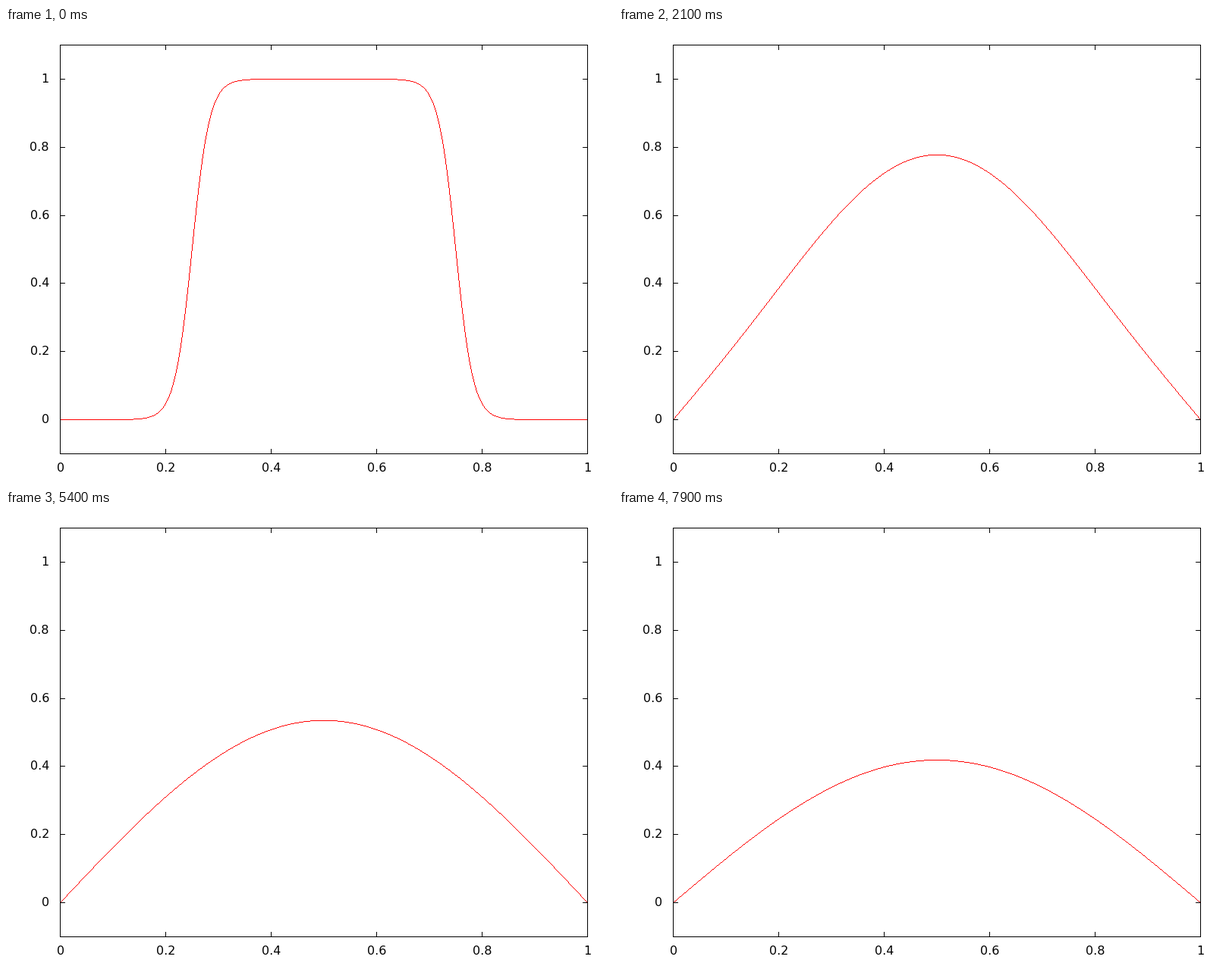
Write a matplotlib script that moves like this. It is 800 px wide and 600 px high and loops after 8000 ms.

```python
import numpy as np
import matplotlib.pyplot as plt
from matplotlib.animation import FuncAnimation
from matplotlib.collections import PolyCollection

W, H = 800, 600
LEFT, RIGHT, TOP, BOTTOM = 71, 766, 22, 561
FRAMES, INTERVAL = 80, 100
DT = 1 / 1024
TIC = 6

plt.rcParams["font.family"] = "DejaVu Sans"
fig = plt.figure(figsize=(W / 72, H / 72), dpi=72, facecolor="white")
ax = fig.add_axes([0, 0, 1, 1])
ax.set_xlim(0, W)
ax.set_ylim(H, 0)
ax.axis("off")


def px(x):
    return LEFT + x * (RIGHT - LEFT)


def py(y):
    return BOTTOM - (y + 0.1) / 1.2 * (BOTTOM - TOP)


def segment(x0, y0, x1, y1, z):
    """Crisp one pixel black bar, both end pixels included."""
    ax.add_patch(plt.Rectangle((x0, y0), x1 - x0 + 1, y1 - y0 + 1,
                               fc="black", lw=0, antialiased=False, zorder=z))


def label(x, y, value, ha):
    ax.text(x, y, f"{value:g}", fontsize=16, ha=ha, va="baseline", color="black")


for v in np.arange(6) / 5:
    cx, cy = round(px(v)), round(py(v))
    segment(cx, TOP, cx, TOP + TIC, 1)
    segment(cx, BOTTOM - TIC, cx, BOTTOM, 1)
    segment(LEFT, cy, LEFT + TIC, cy, 1)
    segment(RIGHT - TIC, cy, RIGHT, cy, 1)
    label(cx + 0.8, 585, v, "center")
    label(57, cy + 5, v, "right")

for y in (TOP, BOTTOM):
    segment(LEFT, y, RIGHT, y, 3)
for x in (LEFT, RIGHT):
    segment(x, TOP, x, BOTTOM, 3)

# Heat equation with zero ends, solved as a sine series.
modes = np.arange(1, 101)
grid = np.arange(1025) / 1024
start = 0.5 * (np.tanh(30 * (grid - 0.25)) - np.tanh(30 * (grid - 0.75)))
coef = 2 / 1024 * np.sin(np.pi * np.outer(modes, grid)) @ start

cols = np.arange(LEFT, RIGHT + 1)
# Samples at each column's left edge, centre and right edge.
samples = (np.arange(2 * len(cols) + 1) / 2 - 0.5) / (RIGHT - LEFT)
basis = np.sin(np.pi * np.outer(np.clip(samples, 0, 1), modes))

curve = PolyCollection([], facecolors="red", edgecolors="none",
                       linewidths=0, antialiaseds=False, zorder=2)
ax.add_collection(curve, autolim=False)


def update(n):
    heat = basis @ (coef * np.exp(-(np.pi * modes) ** 2 * n * DT))
    y = py(heat)
    a, mid, b = y[:-1:2], y[1::2], y[2::2]
    low, high = np.minimum(a, b), np.maximum(a, b)
    steep = high - low > 1
    first = np.where(steep, np.ceil(low), np.rint(mid))
    last = np.where(steep, np.ceil(high), np.rint(mid) + 1)
    x = np.repeat(cols, 2) + np.tile([0, 1], len(cols))
    upper = np.column_stack([x, np.repeat(first, 2)])
    lower = np.column_stack([x, np.repeat(last, 2)])
    curve.set_verts([np.vstack([upper, lower[::-1]])])
    return (curve,)


anim = FuncAnimation(fig, update, frames=FRAMES, interval=INTERVAL,
                     repeat=True, repeat_delay=0, blit=False)
plt.show()
```
